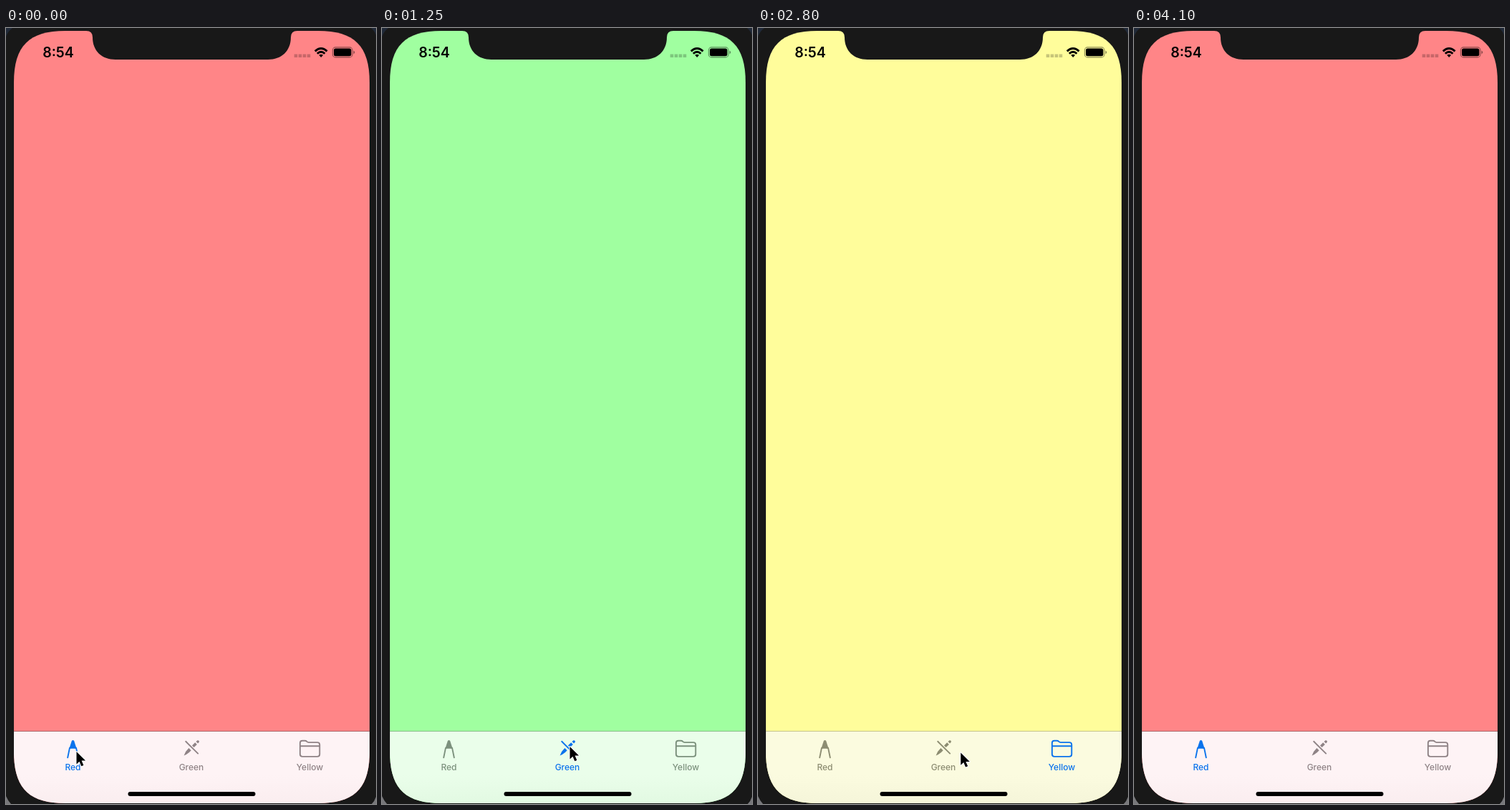
Write an HTML page that moves like this. It is 517 by 1082 pixels and loops after 4.15 s.

```html
<!DOCTYPE html>
<html lang="en">
<head>
<meta charset="utf-8">
<title>Tab bar</title>
<style>
html, body { margin: 0; width: 100%; height: 100%; overflow: hidden; background: #181818; }
svg { display: block; width: 517px; height: 1082px; }
text { font: 500 12px Inter, "Liberation Sans", sans-serif; text-anchor: middle; }
.clock { font-size: 19.5px; font-weight: 600; }
.tab { color: var(--idle); fill: currentColor; }
.tab.on { color: #0b73ec; }
.line { fill: none; stroke: currentColor; stroke-width: 1.9; stroke-linecap: round; stroke-linejoin: round; }
</style>
</head>
<body>
<svg id="stage" viewBox="0 0 517 1082">
  <defs>
    <clipPath id="screen">
      <path d="M11 76C11 25 32 4 83 4H436C487 4 508 25 508 76V1009C508 1060 487 1081 436 1081H83C32 1081 11 1060 11 1009Z"/>
    </clipPath>
    <linearGradient id="bar" x2="0" y2="1">
      <stop offset=".6" stop-color="var(--bar)"/>
      <stop offset="1" stop-color="var(--low)"/>
    </linearGradient>
  </defs>
  <rect width="517" height="1082" fill="#181818"/>
  <path d="M0 0H9Q3 4 0 12ZM517 0H510Q515 4 517 10Z" fill="#202938"/>
  <path d="M0 1071Q3 1078 7 1082H0ZM517 1072Q515 1078 511 1082H517Z" fill="#77777b"/>

  <g clip-path="url(#screen)">
    <rect width="517" height="1082" fill="var(--page)"/>
    <rect y="980" width="517" height="102" fill="url(#bar)"/>
    <rect y="980" width="517" height="1" fill="var(--rule)"/>
  </g>
  <path d="M111 3V4H112Q121 4 121 13C121 32 134 44 153 44H366C385 44 398 32 398 13Q398 4 407 4V3Z" fill="#181818"/>

  <text class="clock" x="73" y="41">8:54</text>
  <path d="M405 36.5v4.6m6-4.6v4.6m6-4.6v4.6m6-4.6v4.6" stroke="#000" stroke-opacity=".22" stroke-width="4.6"/>
  <g fill="none" stroke="#000" stroke-width="2.9">
    <path d="M431.8 32.4Q440.2 24.5 448.6 32.4M434.9 35.8Q440.2 30.8 445.5 35.8"/>
    <path d="M437.3 37.8Q440.2 35.6 443.1 37.8L440.2 41Z" fill="#000" stroke="none"/>
  </g>
  <rect x="456.4" y="26.9" width="27.6" height="14" rx="4" fill="none" stroke="#000" stroke-opacity=".45" stroke-width="1.1"/>
  <rect x="458" y="28.6" width="24.4" height="10.6" rx="2.5"/>
  <path d="M485.6 31.6Q489 34 485.6 36.4Z" fill-opacity=".5"/>

  <g class="tab">
    <path d="M91.8 994Q93.5 992.2 95.2 994L98.6 1004.8H88.4Z"/>
    <path class="line" d="M90.6 1003.6H89L86.2 1017.3M96.4 1003.6H98L100.8 1017.3"/>
    <text x="93.5" y="1035">Red</text>
  </g>
  <g class="tab">
    <path class="line" d="M251.2 994.8L268.2 1011.6"/>
    <path d="M248.6 1014.4Q250.5 1008.5 255.4 1004L258.7 1007.2Q254.4 1012.2 248.6 1014.4ZM260 1000.4L264.2 996.2 266.9 998.9 262.7 1003.1ZM265.5 995L267.5 993.2Q270.6 992.8 269.8 995.8L268.1 997.6Z"/>
    <text x="259" y="1035">Green</text>
  </g>
  <g class="tab">
    <path class="line" d="M410.9 1001.3H438.3M410.9 1012.5V997Q410.9 993.8 414.1 993.8H417.6Q419.3 993.8 420.3 994.9T423 996.1H435Q438.3 996.1 438.3 999.4V1012.5Q438.3 1015.9 435 1015.9H414.2Q410.9 1015.9 410.9 1012.5Z"/>
    <text x="424.5" y="1035">Yellow</text>
  </g>
  <rect x="170.5" y="1065" width="178" height="6" rx="3"/>

  <path id="cursor" d="M0 0V17.4L4 13.7 6.8 20.2 9.9 18.9 7.1 12.6H12.6Z" stroke="#fff" stroke-width="2" stroke-linejoin="round" paint-order="stroke"/>
</svg>
<script>
const LOOP = 4150, STEP = 50;
const stage = document.getElementById('stage');
const cursor = document.getElementById('cursor');
const tabs = [...document.querySelectorAll('.tab')];

const themes = [
  { page: '#ff8587', bar: '#fef3f5', low: '#faedef', rule: '#a96468', idle: '#8f8386' },
  { page: '#a0ffa0', bar: '#eafeea', low: '#e2f9e2', rule: '#89bd89', idle: '#7c917d' },
  { page: '#fffd9b', bar: '#fbfbdf', low: '#f5f5d9', rule: '#c5c48b', idle: '#8d8d72' }
];

// Pointer rests and moves: time, x, y
const path = [
  [0, 98.5, 1009], [100, 98.5, 1009], [1000, 262.5, 1002],
  [1350, 262.5, 1002], [2150, 418.5, 1007],
  [2350, 418.5, 1007], [3350, 100.5, 1015],
  [3600, 100.5, 1015], [3750, 347, 96],
  [3900, 347, 96], [4100, 385, -40], [LOOP, 385, -40]
];

const ease = p => p * p * (3 - 2 * p);

function pointerAt(t) {
  const i = path.findIndex(k => k[0] > t);
  const [t0, x0, y0] = path[i - 1], [t1, x1, y1] = path[i];
  const p = ease((t - t0) / (t1 - t0));
  return [x0 + (x1 - x0) * p, y0 + (y1 - y0) * p];
}

function draw(now) {
  const t = Math.floor(now % LOOP / STEP) * STEP;
  const active = t < 1250 || t >= 3400 ? 0 : t < 2300 ? 1 : 2;
  for (const [name, color] of Object.entries(themes[active])) {
    stage.style.setProperty('--' + name, color);
  }
  tabs.forEach((tab, i) => tab.classList.toggle('on', i === active));
  cursor.setAttribute('transform', `translate(${pointerAt(t)})`);
}

const start = performance.now();
function tick() {
  draw(performance.now() - start);
  requestAnimationFrame(tick);
}
tick();
</script>
</body>
</html>
```
